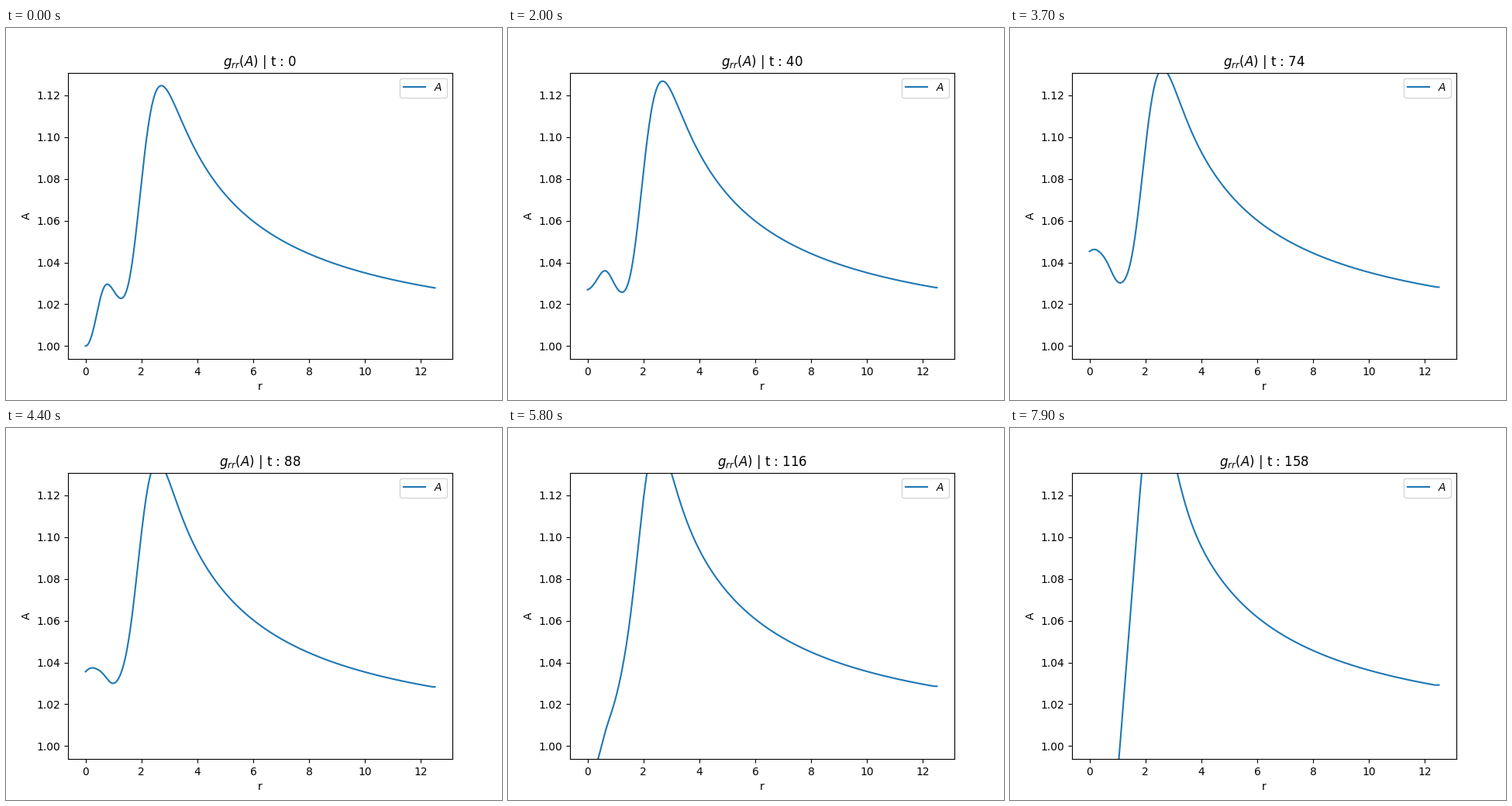
A matplotlib script that plays this animation: 640x480 px, repeating every 8 s.

```python
import math

import numpy as np
import matplotlib.pyplot as plt
from matplotlib.animation import FuncAnimation

FRAMES, STEP = 80, 100
PEAK = 0.12462  # height of the starting profile above 1

erf = np.vectorize(math.erf)
r = np.linspace(1e-3, 12.5, 626)


def start_profile(r):
    """Metric of two mass shells: a small inner one and a large outer one."""
    inner = 0.052 * (1 - np.exp(-(r / 0.63) ** 3))
    outer = 0.5 * (1 + erf(4.8 / math.sqrt(2) * np.log(r / 2.105)))
    mass = inner + (0.625 - 0.12 / r) * outer
    return 1 / np.sqrt(1 - mass / r)


def metric(n):
    t = n * STEP / 1000
    u = n / (FRAMES - 1)
    x = np.minimum(r, 12.5 - 0.15 * u)  # the outer boundary flattens slowly
    rise = 0.1128 * np.exp(-((x - 1.42) / 1.118) ** 2) + 0.014 / (1 + x)
    fall = 0.1925 * (0.67 + 0.33 * u**3) * np.exp(-0.275 * x**3)
    pulse = 0.0686 * math.sin(math.pi * t / 8.2) ** 2
    core = pulse * np.exp(-(x / 0.62) ** 2.2)
    return start_profile(x) + u**2 * (rise - fall) + core


fig, ax = plt.subplots(figsize=(6.4, 4.8), dpi=100)
line, = ax.plot(r, metric(0), label="$A$")
ax.set_xlim(-0.625, 13.125)
ax.set_ylim(1 - 0.05 * PEAK, 1 + 1.05 * PEAK)
ax.set_xlabel("r")
ax.set_ylabel("A")
ax.legend(loc="upper right")
title = ax.set_title("")


def update(n):
    line.set_ydata(metric(n))
    title.set_text(rf"$g_{{rr}}(A)$ | t : {2 * n}")
    return line, title


anim = FuncAnimation(fig, update, frames=FRAMES, interval=STEP,
                     repeat=True, repeat_delay=0, blit=False)
plt.show()
```
